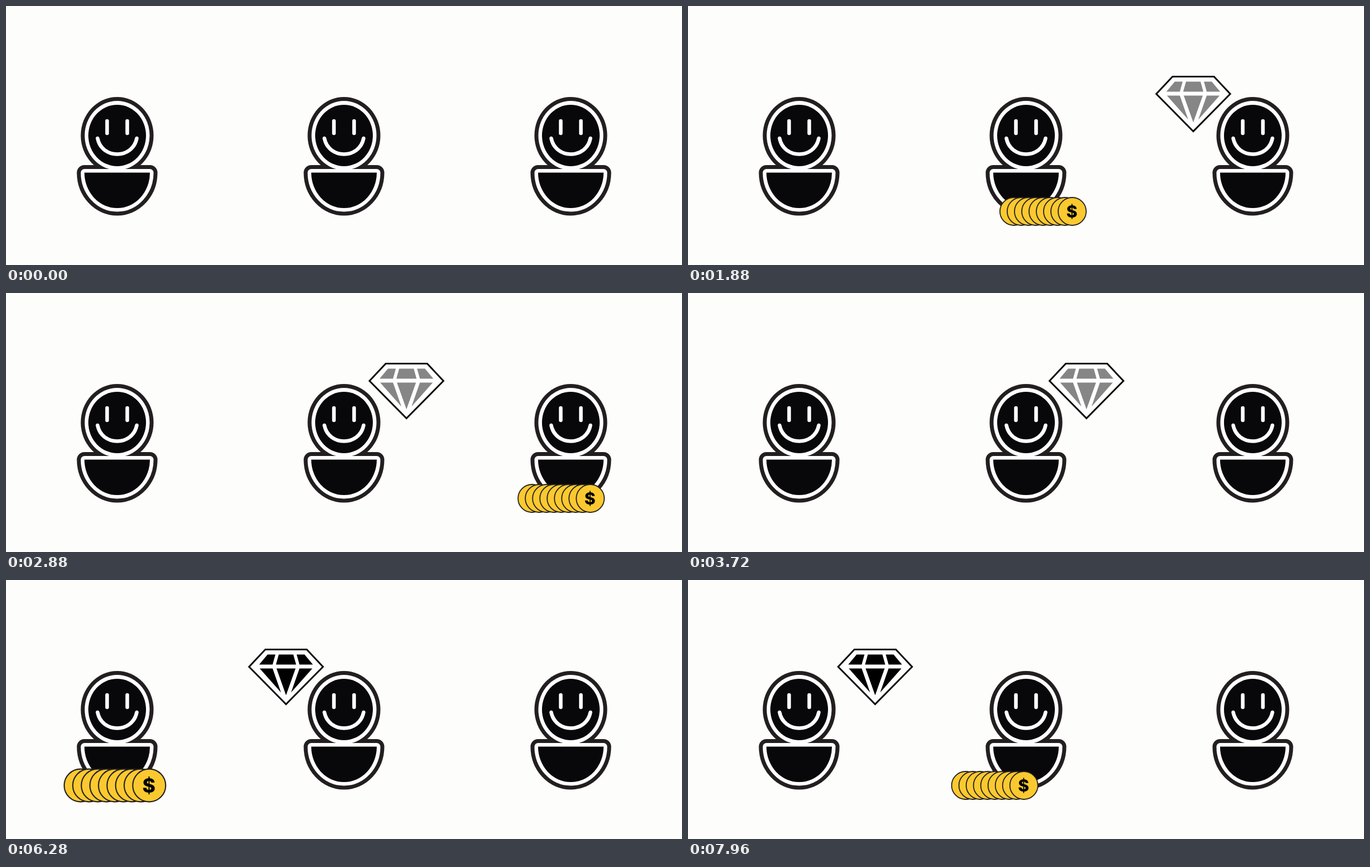
An HTML page that plays this animation: 1207 by 464 pixels, repeating every 8000 ms.

```html
<!DOCTYPE html>
<html lang="en">
<head>
<meta charset="utf-8">
<title>Trade</title>
<style>
  html, body { margin: 0; width: 100%; height: 100%; overflow: hidden; background: #fdfdfb; }
  svg { display: block; width: 100%; height: 100%; }
  text { font: 800 30px Inter, Roboto, sans-serif; text-anchor: middle; }
</style>
</head>
<body>
<svg viewBox="0 0 1207 464">
  <defs>
    <path id="bowl" d="M-58.5 298.5H58.5A58.5 63.5 0 0 1 -58.5 298.5Z" stroke-linejoin="round"/>
    <g id="person">
      <g fill="#231f20" stroke="#231f20">
        <ellipse cy="232" rx="65" ry="69" stroke="none"/>
        <use href="#bowl" stroke-width="27"/>
      </g>
      <g fill="#fff" stroke="#fff">
        <ellipse cy="232" rx="58" ry="62" stroke="none"/>
        <use href="#bowl" stroke-width="13"/>
      </g>
      <g fill="#08080a">
        <ellipse cy="232" rx="51.5" ry="55"/>
        <use href="#bowl"/>
      </g>
      <path d="M-18 206V228M18 206V228M-35 237C-27.5 275 27.5 275 35 237"
            fill="none" stroke="#fff" stroke-width="6.5" stroke-linecap="round"/>
    </g>
    <g id="gem">
      <path d="M-37 -49H37L66 -18L0 49L-66 -18Z" fill="#fff" stroke="#0a0a0a" stroke-width="3"/>
      <path fill="currentColor" d="M-33 -40H-19L-24 -22H-48ZM33 -40H19L24 -22H48ZM-13 -40H13L18 -22H-18Z
        M-47 -15H-24L-9 28ZM47 -15H24L9 28ZM-17 -15H17L0 33Z"/>
    </g>
    <g id="coins"></g>
  </defs>
  <use href="#person" x="198.500"/>
  <use href="#person" x="603.500"/>
  <use href="#person" x="1008.500"/>
  <use id="grayGem" href="#gem" color="#868686"/>
  <use id="blackGem" href="#gem" color="#000"/>
  <use id="coinsA" href="#coins"/>
  <use id="coinsB" href="#coins"/>
</svg>
<script>
const LOOP = 8000;
const $ = id => document.getElementById(id);

let stack = '';
for (let i = 0; i < 9; i++) {
  stack += `<circle cx="${i * 13 - 52}" r="25" fill="#fbc92f" stroke="#231f20" stroke-width="1.8"/>`;
}
$('coins').innerHTML = stack + '<text x="51.5" y="11">$</text>';

const span = (t, start, dur) => Math.min(1, Math.max(0, (t - start) / dur));
const mix = (a, b, p) => a + (b - a) * p;
const easeOut = (u, n) => 1 - (1 - u) ** n;
const backIn = (u, k = 1.7) => u * u * ((k + 1) * u - k);

// Damped spring from 0 to 1 that settles in about dur ms.
function spring(t, start, dur) {
  const u = span(t, start, dur);
  return u < 1 ? 1 - Math.exp(-5.8 * u) * Math.cos(9.6 * u) : 1;
}

function place(id, x, y, scale) {
  $(id).setAttribute('transform', `translate(${x} ${y}) scale(${scale})`);
  $(id).style.display = scale > 0.02 ? '' : 'none';
}

function draw(t) {
  const first = span(t, 1870, 1130);
  const second = span(t, 7270, 920);

  // The gray gem shrinks into the middle person.
  const sink = span(t, 4720, 280) ** 2;
  const grayX = mix(905.5, 711.5, easeOut(first, 1.78));
  place('grayGem', mix(grayX, 604, sink), mix(175.5, 255, sink), spring(t, 960, 480) * (1 - sink));

  place('blackGem', mix(500, 306.5, easeOut(second, 1.4)), 173.5, 1 - backIn(1 - span(t, 3720, 280)));

  place('coinsA', mix(628, 1000.5, easeOut(first, 1.64)), 368,
    spring(t, 960, 480) * (1 - backIn(span(t, 3160, 540), 2.2)));
  place('coinsB', mix(194.5, 606.5, easeOut(second, 1.4)), 368, spring(t, 6000, 1000));
}

function tick(now) {
  draw(now % LOOP);
  requestAnimationFrame(tick);
}
draw(0);
requestAnimationFrame(tick);
</script>
</body>
</html>
```
